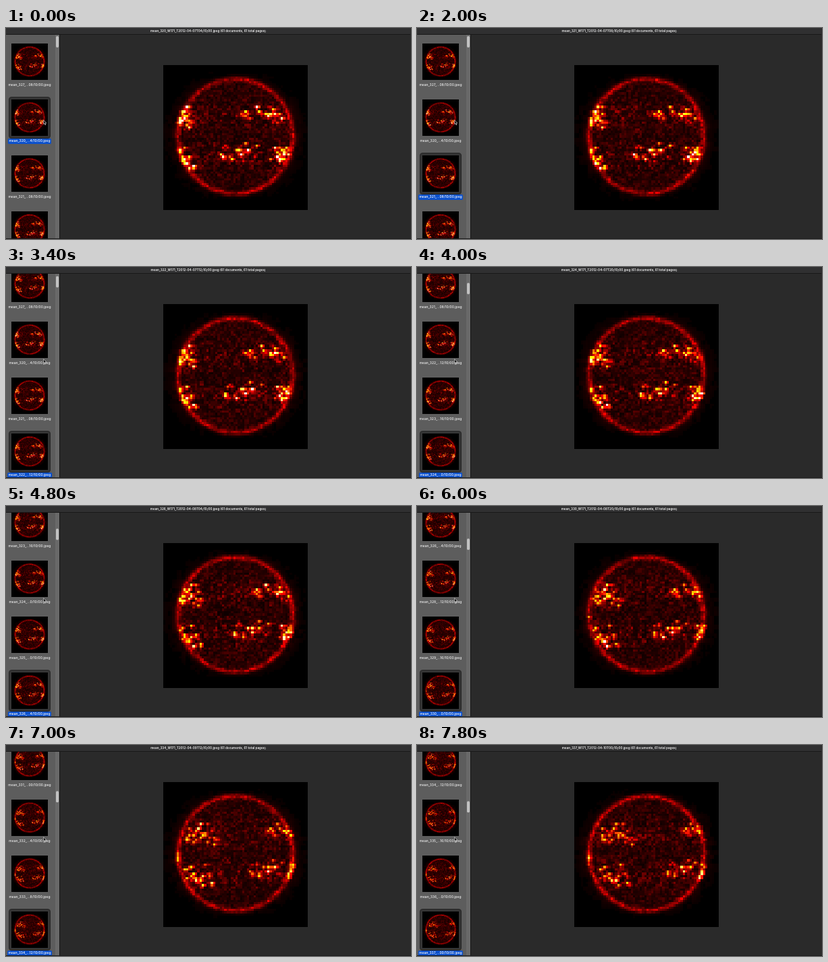
These frames come from a looping animation (600 by 313 pixels, 8000 ms). An HTML page with a canvas:

```html
<!DOCTYPE html>
<html lang="en">
<head>
<meta charset="utf-8">
<title>Solar image viewer</title>
<style>
  html, body { margin: 0; width: 100%; height: 100%; overflow: hidden; background: #2a2a2a; }
  body { position: relative; font: 500 4.95px/7.5px Inter, "Open Sans", sans-serif; color: #f0f0f0; white-space: nowrap; }
  div, canvas, svg { position: absolute; }
  #title { left: 0; top: 0; width: 599px; height: 10px; font-size: 4.6px; font-weight: 600; line-height: 10px; text-align: center; background: #303031; border-bottom: 1px solid #181818; box-sizing: border-box; z-index: 2; }
  #side { left: 0; top: 10px; width: 79px; height: 303px; overflow: hidden; background: #5d5d5d; border-right: 1px solid #161616; }
  #track { left: 73px; top: 0; width: 6px; height: 303px; background: #696969; }
  #thumb { left: 74px; top: 1.5px; width: 4px; height: 17px; border-radius: 2px; background: #c2c2c2; }
  #view { left: 233px; top: 55px; width: 214px; height: 215px; image-rendering: pixelated; }
  #foot { left: 0; top: 312px; width: 600px; height: 1px; background: #1c1c1c; }
  .row { left: 0; width: 70px; height: 83px; }
  .row canvas { left: 8px; top: 13px; width: 54px; height: 54px; }
  .row .frame { left: 4px; top: 9px; width: 60px; height: 60px; border: 1px solid #252525; border-radius: 4px; background: #343434; visibility: hidden; }
  .row .label { left: 35px; top: 71px; padding: 0 1.5px; border-radius: 1.5px; transform: translateX(-50%); }
  .on .frame { visibility: visible; }
  .on .label { background: #0b50cc; color: #fff; }
  #pointer { left: 55px; top: 135.5px; }
</style>
</head>
<body>
<div id="side"><div id="list"></div><div id="track"></div><div id="thumb"></div></div>
<canvas id="view" width="64" height="64"></canvas>
<div id="title"></div>
<div id="foot"></div>
<svg id="pointer" width="6" height="9" viewBox="0 0 6 9">
  <path d="M.6 .6V6.6L2 5.4L3 7.8L4 7.4L3 5.1H4.9Z" fill="#111" stroke="#eee" stroke-width=".6"/>
</svg>
<script>
const LOOP = 8000, STEP = 200, PITCH = 83;
const GRID = 64, RADIUS = 25.8, CX = 31.5, CY = 31;
const FIRST = 320, TURN = 2.2; // degrees of solar rotation per document

const docs = [327];
for (let n = FIRST; n <= 337; n++) if (n !== 327) docs.push(n);

// Active clusters: longitude in the first document, height in cells, width in degrees.
const clusters = [
  [9, -10, 8], [42, -10, 18], [-72, -8, 26],
  [5, 7, 20], [55, 8, 18], [-78, 10, 20], [-125, 2, 14]
];

const el = id => document.getElementById(id);
const pad = v => String(v).padStart(2, "0");
const clamp = v => Math.max(0, Math.min(1, v));
const bell = (v, width) => Math.exp(-v * v / width);
const hash = (x, y, s) => {
  const v = Math.sin(x * 127.1 + y * 311.7 + s * 74.7) * 43758.5453;
  return v - Math.floor(v);
};
const stamp = n => {
  const hours = (n - 319) * 4;
  return { day: pad(7 + Math.floor(hours / 24)), hour: pad(hours % 24) };
};
const fullName = n => {
  const { day, hour } = stamp(n);
  return `mean_${n}_W171_T2012-04-${day}T${hour}/10/00.jpeg (61 documents, 61 total pages)`;
};
// Narrow digits leave room for one more character after the ellipsis.
const shortName = n => {
  const { hour } = stamp(n);
  const narrow = /[17]$/.test(n) || hour[0] === "1";
  return `mean_${n}_...${narrow ? hour : hour[1]}/10/00.jpeg`;
};

// Mottled disc with two activity belts, a broken limb and a faint corona.
function quietSun(n) {
  return Float32Array.from({ length: GRID * GRID }, (_, i) => {
    const x = i % GRID, y = Math.floor(i / GRID);
    const dx = x - CX, dy = y - CY, gap = Math.hypot(dx, dy) - RADIUS;
    const grain = hash(x, y, n), coarse = hash(x >> 1, y >> 1, n + 5);
    const side = Math.abs(dx) / Math.hypot(dx, dy);
    const belt = bell(Math.abs(dy) - 9, 40);
    const surface = gap < 0
      ? .02 + .07 * grain ** 2 + .03 * coarse + .13 * belt * (grain * coarse) ** 1.5
      : .05 * Math.exp(-gap / 3.5) * (.2 + side) * (.5 + coarse);
    const limb = bell(gap + .4, 1.1) * (.1 + .07 * coarse + .1 * grain);
    const v = surface + limb;
    return v > .012 ? v : 0;
  });
}

function addClusters(cells, n) {
  const raise = (x, y, v) => {
    const i = y * GRID + x;
    cells[i] = Math.max(cells[i], v);
  };
  const age = n - FIRST;
  clusters.forEach(([lon, height, width], k) => {
    for (let i = 0; i < width * 2.2; i++) {
      const spread = s => 1.2 * (hash(i, k, s) + hash(i, k, s + 1) - 1);
      const angle = (lon + width * spread(1) + age * TURN) * Math.PI / 180;
      if (Math.cos(angle) < -.08) continue;
      const dy = height + (.5 + width * .18) * spread(3);
      const x = Math.round(CX + Math.sqrt(RADIUS ** 2 - dy ** 2) * Math.sin(angle));
      const y = Math.round(CY + dy);
      const flicker = .75 + .5 * hash(i, k, n);
      const v = (1 - .012 * age) * (.2 + .75 * hash(i, k, 5) ** 2.2) * flicker;
      raise(x, y, v);
      raise(x + 1, y, v * .45);
      raise(x, y + 1, v * .35);
      raise(x - 1, y, v * .25);
    }
  });
}

function paintSun(canvas, n) {
  const cells = quietSun(n);
  addClusters(cells, n);
  const ctx = canvas.getContext("2d"), image = ctx.createImageData(GRID, GRID);
  cells.forEach((v, i) => {
    const heat = [v / .365, (v - .365) / .381, (v - .746) / .254];
    heat.forEach((c, j) => { image.data[i * 4 + j] = 255 * clamp(c); });
    image.data[i * 4 + 3] = 255;
  });
  ctx.putImageData(image, 0, 0);
}

function make(tag, className, parent) {
  const node = document.createElement(tag);
  node.className = className;
  parent.append(node);
  return node;
}

const rows = docs.map((n, i) => {
  const row = make("div", "row", el("list"));
  row.style.top = i * PITCH + "px";
  make("div", "frame", row);
  const sun = make("canvas", "sun", row);
  sun.width = sun.height = GRID;
  paintSun(sun, n);
  make("div", "label", row).textContent = shortName(n);
  return { row, sun };
});

let selected = -1;
function select(index) {
  if (index === selected) return;
  selected = index;
  const scroll = Math.max(0, index * PITCH - 224);
  rows.forEach(({ row }, i) => row.classList.toggle("on", i === index));
  el("list").style.transform = `translateY(${-scroll}px)`;
  el("thumb").style.transform = `translateY(${scroll * .06}px)`;
  el("title").textContent = fullName(docs[index]);
  el("view").getContext("2d").drawImage(rows[index].sun, 0, 0);
}

// The selection rests, moves down once, then keeps moving with rising speed.
function rowAt(t) {
  if (t < 2000) return 1;
  const u = Math.max(0, Math.floor(t / STEP) * STEP - 3000) / 1000;
  return t < 3000 ? 2 : Math.floor(3 + 2 * u + .2 * u * u);
}

const start = performance.now();
function tick() {
  select(rowAt((performance.now() - start) % LOOP));
  requestAnimationFrame(tick);
}
tick();
</script>
</body>
</html>
```
